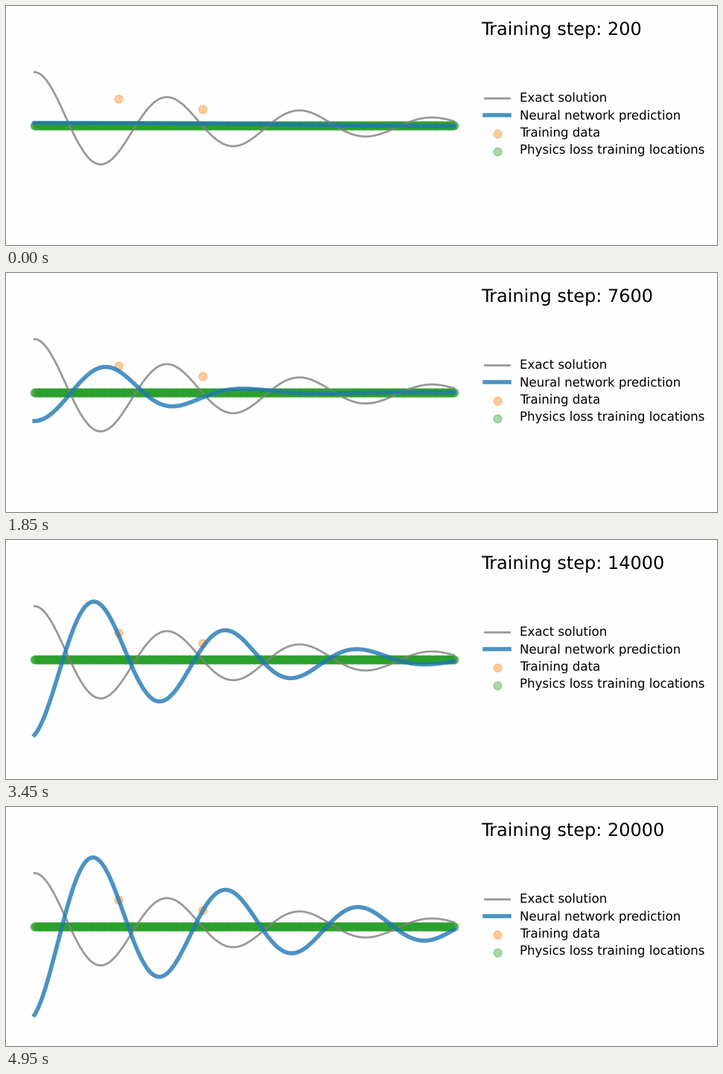
A matplotlib script for the animation above (5000 ms loop, 955 px wide and 322 px high).

```python
import numpy as np
import matplotlib.pyplot as plt
from matplotlib.animation import FuncAnimation

plt.rcParams["font.family"] = "DejaVu Sans"
plt.rcParams["text.hinting"] = "none"

WIDTH, HEIGHT, DPI = 955, 322, 100
FRAMES, INTERVAL = 100, 50
STEPS_PER_FRAME = 200

DAMPING, NATURAL_FREQ = 2, 20
OMEGA = np.sqrt(NATURAL_FREQ**2 - DAMPING**2)

x = np.linspace(0, 1, 500)

# Wave parameters at a few key moments of the training, linear in between
KEYS = [0, 14, 30, 45, 55, 69, 83]
WAVE = {
    "height": [0.048, 0.076, 0.25, 0.78, 0.96, 1.085, 1.293],
    "peak": [0, 0.26, 0.195, 0.147, 0.144, 0.1415, 0.1395],
    "freq": [1.9, 6.8, 16.5, 20.2, 20.1, 20, OMEGA],
    "damping": [0, 0.8, -1, 2, 2, 2, DAMPING],
    "falloff": [0, 0.8, 4, 1.46, 1.35, 1.15, 0.35],
    "drag": [0, 0, 0, 0.12, 0.07, 0.015, 0],
}


def damped_wave(t, freq, damping, lag=0):
    """Damped oscillation with its first peak, of height 1, at t = 0."""
    phase = freq * (t - lag)
    return np.exp(-damping * t) * (np.cos(phase) + damping / freq * np.sin(phase))


def prediction(frame):
    """Wave that fades out to the right and lags behind at the far end."""
    p = {name: np.interp(frame, KEYS, values) for name, values in WAVE.items()}
    wave = damped_wave(x - p["peak"], p["freq"], p["damping"], p["drag"] * x**5)
    return p["height"] * wave / (1 + (p["falloff"] * x)**4.5)


fig = plt.figure(figsize=(WIDTH / DPI, HEIGHT / DPI), dpi=DPI, facecolor="#fefefe")
ax = fig.add_axes([10 / WIDTH, 10 / HEIGHT, 620 / WIDTH, 302 / HEIGHT])
ax.set_xlim(-0.05, 1.05)
ax.set_ylim(-2.1, 2.1)
ax.axis("off")


def draw_line(xs, ys, color, width):
    return ax.plot(xs, ys, color=color, linewidth=width, alpha=0.8, clip_on=False)[0]


def draw_dots(xs, ys, color):
    ax.scatter(xs, ys, s=60, color=color, alpha=0.4, clip_on=False)


exact_style = ("grey", 2)
network_style = ("tab:blue", 4)

draw_line(x, damped_wave(x, OMEGA, DAMPING), *exact_style)
line = draw_line(x, prediction(0), *network_style)
draw_dots([0.2, 0.4], [0.5, 0.305], "tab:orange")
draw_dots(x, np.zeros_like(x), "tab:green")

# Legend rows, top to bottom: text baseline with the sample slightly above it
LEGEND_TOP, ROW_PITCH = 0.435, 0.3255
labels = ["Exact solution", "Neural network prediction", "Training data",
          "Physics loss training locations"]
rows = LEGEND_TOP - ROW_PITCH * np.arange(len(labels))
for label, y in zip(labels, rows):
    ax.text(1.1557, y, label, fontsize="large", color="k")
for y, style in zip(rows[:2], (exact_style, network_style)):
    draw_line([1.073, 1.132], [y + 0.081] * 2, *style)
for y, color in zip(rows[2:], ("tab:orange", "tab:green")):
    draw_dots([1.1025], [y + 0.061], color)

title = ax.text(1.065, 1.7, "", fontsize="xx-large", color="k")


def update(frame):
    line.set_ydata(prediction(frame))
    title.set_text(f"Training step: {(frame + 1) * STEPS_PER_FRAME}")
    return line, title


anim = FuncAnimation(fig, update, frames=FRAMES, interval=INTERVAL,
                     repeat=True, repeat_delay=0)
plt.show()
```
